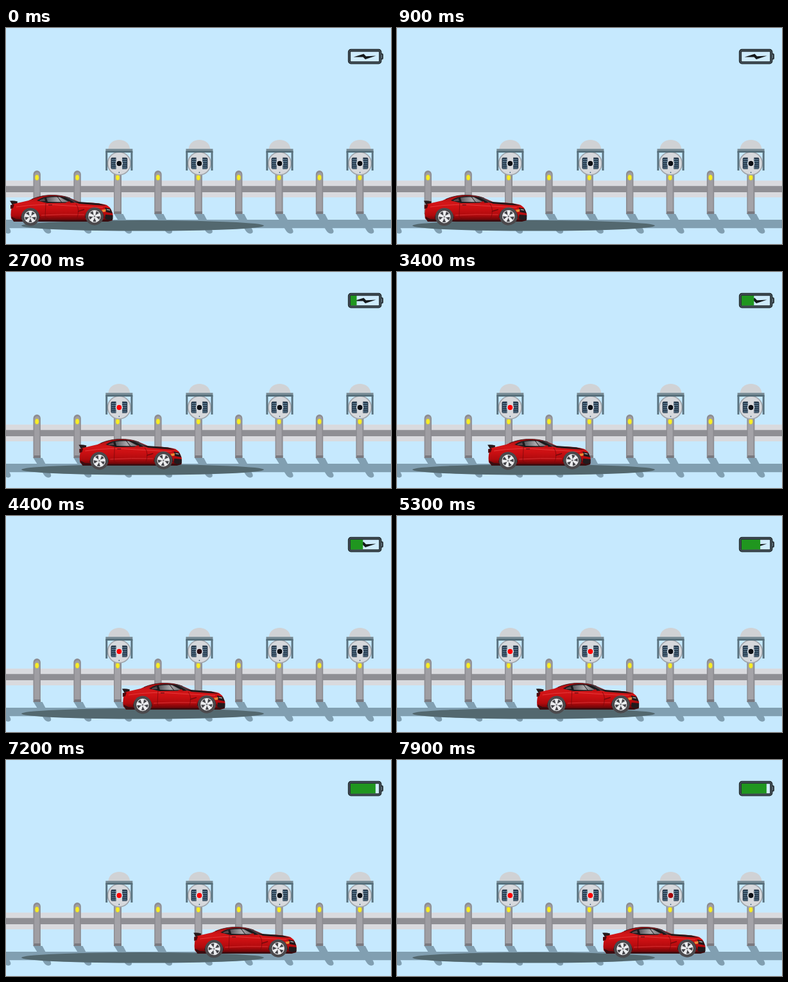
Write an HTML page that moves like this. It is 600 px wide and 338 px high and loops after 8 s.

```html
<!DOCTYPE html>
<html lang="en">
<head>
<meta charset="utf-8">
<style>
html, body { margin: 0; width: 100%; height: 100%; overflow: hidden; background: #c6e9fe; }
svg { display: block; width: 100vw; height: 100vh; }
</style>
</head>
<body>
<svg viewBox="0 0 600 338" preserveAspectRatio="none">
  <defs>
    <linearGradient id="paint" x2="0" y2="1">
      <stop offset="0" stop-color="#a50d10"/>
      <stop offset=".3" stop-color="#d31618"/>
      <stop offset=".5" stop-color="#cc1013"/>
      <stop offset=".78" stop-color="#b00a0d"/>
      <stop offset="1" stop-color="#5c0508"/>
    </linearGradient>
    <linearGradient id="glass">
      <stop offset="0" stop-color="#55555a"/>
      <stop offset=".5" stop-color="#a9a8ab"/>
      <stop offset="1" stop-color="#6b686c"/>
    </linearGradient>
    <g id="post">
      <path d="M-5.7 291V229a5.700 6 0 0 1 11.400 0V291z" fill="#8d8c91"/>
      <path d="M-4 287V230A4.400 5 0 0 1 4 228V287z" fill="#9f9ea3"/>
      <path d="M-5.700 291L-4 287H5.700V291z" fill="#7a797f"/>
      <ellipse cy="234" rx="3" ry="4.300" fill="#f8ed26" stroke="#c5bd55" stroke-width=".6"/>
    </g>
    <g id="meterPost">
      <path d="M-6 226H6V291H-6z" fill="#8d8c91"/>
      <path d="M-4.600 226H4V287H-4.600z" fill="#a4a3a8"/>
      <path d="M-6 291L-4.600 287H6V291z" fill="#7a797f"/>
      <ellipse cy="234" rx="3" ry="4.300" fill="#f8ed26" stroke="#c5bd55" stroke-width=".6"/>
    </g>
    <g id="pad">
      <path d="M-4 -7Q-4 -9 -2 -9H4V9H-2Q-4 9 -4 7z" fill="#1f3042"/>
      <path d="M-1.900 -7V8M.4 -7V8M2.700 -7V8" stroke="#83a8c0" stroke-width="1.200" stroke-dasharray="1.900 1.400"/>
    </g>
    <g id="meter">
      <path d="M-17 190C-16 170 16 170 17 190z" fill="#d0d2d5"/>
      <circle cy="212" r="17.800" fill="#d6d8dc" stroke="#a0a5ab" stroke-width="1.600"/>
      <path d="M-21 189H21V195H-21z" fill="#7b8e98"/>
      <path d="M-21 193.500H21" stroke="#526b77" stroke-width="2.600"/>
      <path d="M-19.600 194V223M19.600 194V223" stroke="#5a7380" stroke-width="3"/>
      <use href="#pad" x="-8.800" y="211.800"/>
      <use href="#pad" transform="translate(8.800 211.800) scale(-1 1)"/>
      <circle cy="212" r="5.500" fill="#dfe1e5"/>
      <circle cy="226" r=".9" fill="#4a6a86"/>
    </g>
    <g id="wheel">
      <circle r="14" fill="#4b494c"/>
      <circle r="9.700" fill="#e4e5e7"/>
      <circle r="8.600" fill="#434348"/>
      <g id="spokes"></g>
      <circle r="2.300" fill="#d8d9dc"/>
      <circle r="1" fill="#55555a"/>
    </g>
  </defs>

  <path d="M0 0H600V338H0z" fill="#c6e9fe"/>
  <path d="M0 238.800H600V265H0z" fill="#d9dade"/>
  <path d="M0 247.200H600V257H0z" fill="#8f8f94"/>
  <path d="M0 300H600V313.200H0z" fill="#819fb1"/>
  <g id="shadows" fill="#819fb1"></g>
  <ellipse cx="213" cy="309.300" rx="189" ry="8.300" fill="#53686f"/>
  <g id="posts"></g>

  <g id="battery">
    <path d="M584 40.500H585.500Q587 40.500 587 42V47Q587 48.500 585.500 48.500H584" fill="#c6e9fe" stroke="#283137" stroke-width="2"/>
    <rect x="535" y="35" width="48.300" height="19.300" rx="2.500" fill="#cfecfd" stroke="#283137" stroke-width="4.300"/>
    <rect x="535" y="35" width="48.300" height="19.300" rx="2.500" fill="none" stroke="#5b6970" stroke-width=".9"/>
    <path d="M541.500 45.500L557.500 40.500L561 44.300L576.500 43.500L560 49L556.500 45.600z" fill="#15191b"/>
    <g id="cells" fill="#20961f"></g>
  </g>

  <g id="car">
    <path d="M6 270.500Q11 269.500 18 271.500L17 277H10z" fill="#25191b"/>
    <path d="M11 275.500L35 270Q49 263 66 261.500Q86 260.800 100 266L116 273Q144 273 157 277L162 281Q165 286 166.500 291L166 301L158 302H12L8 298Q6 286 11 275.500z" fill="url(#paint)"/>
    <path d="M8 295L12 303H159L166 301V298L152 300L124 300.500H53L16 299z" fill="#3a0d10"/>
    <path d="M40 268Q52 262.500 68 261.600Q87 261 100 266.200" fill="none" stroke="#3c1216" stroke-width=".9"/>
    <path d="M48 270Q57 263.700 72 263Q88 262.800 98 266.500L107 273.500L64 274z" fill="#1b1a1d"/>
    <path d="M65 272L63 265.500Q75 263.800 84 264.800L99 272.500z" fill="url(#glass)"/>
    <path d="M52 269.500L60 266.500L61 271H53z" fill="#55474b"/>
    <path d="M80 264L87 273" stroke="#1b1a1d"/>
    <path d="M90 263.500Q98 265 103 268L116 273.500H108z" fill="#403d42"/>
    <path d="M106 271.500L120 272.500L145 274.500L157 278L137 276.800L114 275z" fill="#24191b"/>
    <path d="M16 280Q54 274 96 278L151 281" fill="none" stroke="#e63a3b" stroke-width="1"/>
    <path d="M55 293Q88 291 122 292" fill="none" stroke="#d93234" stroke-width="1"/>
    <path d="M62 274L61 296L68 299H110Q116 284 109 275" fill="none" stroke="#7b090c" stroke-width=".8"/>
    <path d="M112 287L122 284" stroke="#750a0c" stroke-width="1.500"/>
    <path d="M66 277H72" stroke="#651015" stroke-width="1.200"/>
    <path d="M93 273L99 271L102 275H95z" fill="#bd1013"/>
    <path d="M7 277L13 276L11 282L7 283z" fill="#4d080c"/>
    <path d="M154 281L163 283L166 290L156 288zM155 292L166.500 293V299L159 300.500L154 298z" fill="#211a1d"/>
    <path d="M149 284.500L156 283.500L155 287.500L151 288z" fill="#e98a35"/>
    <path d="M157 284L162 285" stroke="#dadbdd" stroke-width="1.200"/>
    <path d="M23 298A15 15 0 0 1 53 298zM123 297A15 15 0 0 1 153 297z" fill="#301518"/>
    <g class="wheel" data-x="38" data-y="295.500"><use href="#wheel"/></g>
    <g class="wheel" data-x="138" data-y="294.700"><use href="#wheel"/></g>
  </g>
</svg>
<script>
const $ = id => document.getElementById(id);
const repeat = (n, part) => Array.from({ length: n }, (_, i) => part(i)).join('');
const ramp = (t, start, length) => Math.max(0, Math.min(1, (t - start) / length));
const postX = i => 48.2 + i * 62.9;

$('spokes').innerHTML = repeat(5, i =>
  `<path d="M-1 0L-2.800 -9H2.800L1 0z" fill="#ebecee" transform="rotate(${i * 72})"/>`);
$('shadows').innerHTML = repeat(10, i =>
  `<path d="M${postX(i - 1) - 5.5} 291h14l13 25q2 5 -3 5.700q-5 0 -8 -5z"/>`);
$('posts').innerHTML = repeat(9, i =>
  `<use href="#${i > 0 && i % 2 === 0 ? 'meterPost' : 'post'}" x="${postX(i)}"/>`) +
  repeat(4, i => `<g transform="translate(${176.3 + i * 125.1})"><use href="#meter"/>
    <circle class="light" cy="212" r="3.900"/></g>`);
// Each charge level covers the one before it.
$('cells').innerHTML = repeat(4, i =>
  `<path d="M537 37H${546.5 + i * 9.8}V52.300H537z"/>`);

const lights = [...document.querySelectorAll('.light')];
const wheels = [...document.querySelectorAll('.wheel')];
const cells = [...$('cells').children];
const lightStarts = [1300, 4300, 7400, 9999];
const cellStarts = [1600, 2900, 4700, 6600];

function draw(now) {
  const t = Math.floor(now % 8000 / 100) * 100;
  const x = t * 0.03975;
  $('car').setAttribute('transform', `translate(${x})`);
  for (const w of wheels)
    w.setAttribute('transform', `translate(${w.dataset.x} ${w.dataset.y}) rotate(${x / 14 * 180 / Math.PI})`);
  lights.forEach((light, i) => {
    const k = ramp(t, lightStarts[i], 800);
    light.setAttribute('fill', `rgb(${12 + 243 * k},${14 * (1 - k)},${20 * (1 - k)})`);
  });
  cells.forEach((cell, i) => cell.setAttribute('opacity', ramp(t, cellStarts[i], 450)));
  requestAnimationFrame(draw);
}
draw(0);
</script>
</body>
</html>
```
